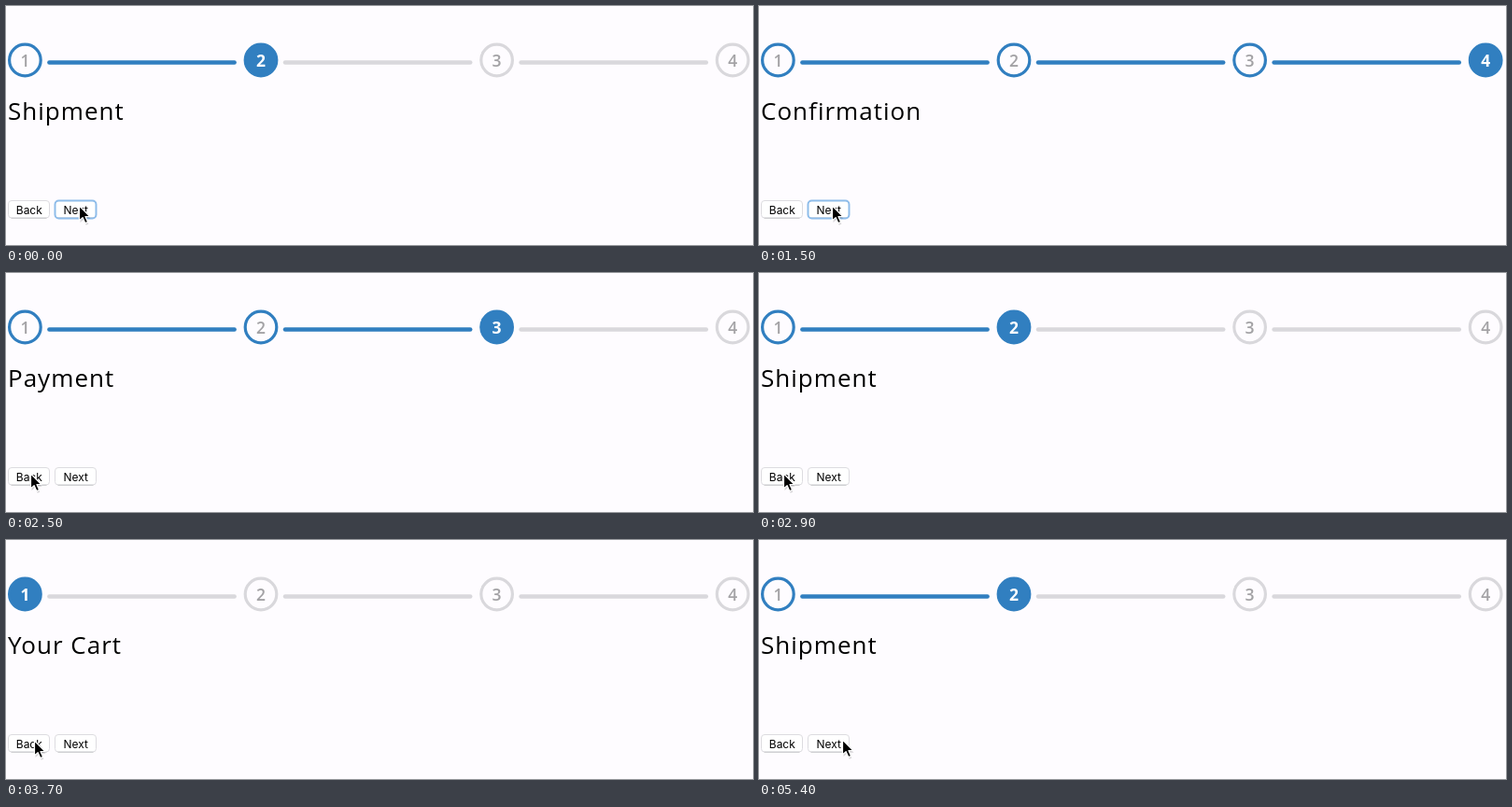
An HTML page for the animation above (5.5 s loop, 800 by 256 pixels).

```html
<!DOCTYPE html>
<html lang="en">
<head>
<meta charset="utf-8">
<title>Checkout steps</title>
<style>
  html, body { margin: 0; width: 100%; height: 100%; overflow: hidden; background: #fefcff; }
  svg { display: block; width: 800px; height: 256px; }
  .bar { stroke: #d9d8dc; stroke-width: 4.5; stroke-linecap: round; }
  .step circle { fill: #fefcff; stroke: #d9d8dc; stroke-width: 3.2; }
  .step text { font: 600 17.5px "Open Sans", sans-serif; fill: #a3a2a5; text-anchor: middle; }
  .bar.done, .done circle, .active circle { stroke: #317fc0; }
  .active circle { fill: #317fc0; }
  .active text { font-weight: 700; fill: #fff; }
  #title { font: 26px "Open Sans", sans-serif; letter-spacing: 1px; }
  .button text { font: 12px Inter, sans-serif; text-anchor: middle; }
  .button rect { fill: #fff; stroke: #dddce0; }
  .button path { stroke: #c6c5c9; }
  #ring { fill: none; stroke: #8fbdea; stroke-width: 2; }
</style>
</head>
<body>
<svg viewBox="0 0 800 256">
  <g id="steps"></g>
  <text id="title" x="2" y="122"></text>
  <g id="buttons"></g>
  <rect id="ring" x="52.5" y="208.5" width="44" height="19" rx="4"/>
  <g id="arrow" stroke-linejoin="round">
    <path d="M1 2V18l3.6-3.3 2.7 6 2.6-1.1-2.6-5.9H12z" opacity=".15"/>
    <path d="M0 0V16l3.6-3.4 2.7 6 2.8-1.2-2.6-5.9H11.4z" stroke="#fff" stroke-width="1.2"/>
  </g>
  <path id="beam" d="M-3.5-8Q0-8 0-5.5Q0-8 3.5-8M0-5.5V6M-2 2.5H2M-3.5 8.5Q0 8.5 0 6Q0 8.5 3.5 8.5"
        fill="none" stroke="#222" stroke-width="1.3"/>
</svg>
<script>
const LOOP = 5500, TICK = 100, GAP = 252.6;
const titles = ['Your Cart', 'Shipment', 'Payment', 'Confirmation'];
const nextClicks = [300, 1500, 4100];
const backClicks = [2300, 2800, 3400];

const $ = id => document.getElementById(id);
const show = (id, on) => $(id).style.display = on ? '' : 'none';

$('steps').innerHTML = titles.map((_, i) => {
  const x = 20.4 + GAP * i;
  const bar = i < 3 ? `<path class="bar" d="M${x + 26} 60.5h198.2"/>` : '';
  return `${bar}<g class="step"><circle cx="${x}" cy="58" r="16.8"/>
    <text x="${x}" y="65">${i + 1}</text></g>`;
}).join('');

$('buttons').innerHTML = ['Back', 'Next'].map((label, i) =>
  `<g class="button" transform="translate(${2.5 + 50 * i} 208.5)">
    <rect width="44" height="18.5" rx="3.5"/><path d="M3 18.7h38"/>
    <text x="22.3" y="14.2">${label}</text></g>`).join('');

const bars = document.querySelectorAll('.bar');
const steps = document.querySelectorAll('.step');

const countBy = (times, t) => times.filter(time => time <= t).length;

// Ease-out progress from 0 to 1
function glide(t, from, to) {
  const k = Math.min(1, Math.max(0, (t - from) / (to - from)));
  return k * (2 - k);
}

function pointerAt(t) {
  const toBack = glide(t, 1900, 2180), drift = glide(t, 2900, 3300);
  const toNext = glide(t, 3700, 4100), leave = glide(t, 4200, 4800);
  return [
    78.5 - 52 * toBack + 4 * drift + 50 * toNext + 9 * leave,
    214 + toBack + 2 * toNext - 3 * leave
  ];
}

function draw(now) {
  const t = Math.floor(now % LOOP / TICK) * TICK;
  const active = 1 + countBy(nextClicks, t) - countBy(backClicks, t);
  const [x, y] = pointerAt(t);
  const betweenButtons = x > 47 && x < 52;

  bars.forEach((bar, i) => bar.classList.toggle('done', i < active));
  steps.forEach((step, i) => {
    step.classList.toggle('done', i < active);
    step.classList.toggle('active', i === active);
  });
  $('title').textContent = titles[active];
  show('ring', t < backClicks[0]);
  show('arrow', !betweenButtons);
  show('beam', betweenButtons);
  for (const id of ['arrow', 'beam']) $(id).setAttribute('transform', `translate(${x} ${y})`);
}

const start = performance.now();
function frame() {
  draw(performance.now() - start);
  requestAnimationFrame(frame);
}
frame();
</script>
</body>
</html>
```
